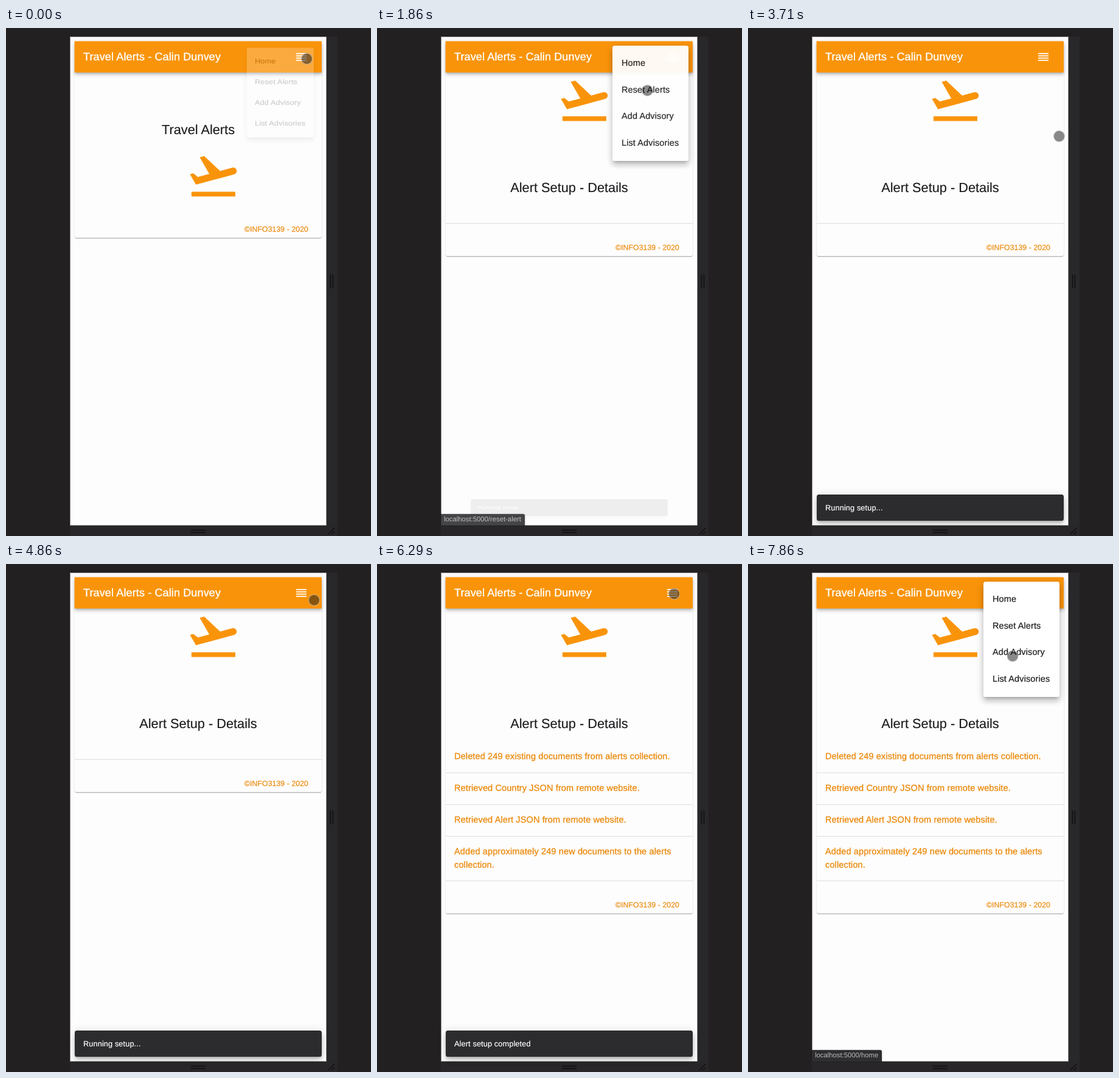
Write an HTML page that moves like this. It is 600 by 833 pixels and loops after 8 s.

```html
<!DOCTYPE html>
<html lang="en">
<head>
<meta charset="utf-8">
<title>Travel Alerts</title>
<style>
html, body { margin: 0; width: 100%; height: 100%; overflow: hidden; background: #232022; }
body { font-family: "Liberation Sans", Arial, sans-serif; text-rendering: geometricPrecision; position: relative; }
div, svg { position: absolute; box-sizing: border-box; }
.t { line-height: 20px; white-space: pre; }
#phone { left: 106px; top: 15px; width: 420px; height: 800px; background: #fefdfe;
  box-shadow: 0 0 0 1px rgba(254,253,254,.5); }
#rail { left: 526px; top: 14px; width: 19px; height: 802px; background: #282628; }
#foot { left: 105px; top: 815px; width: 440px; height: 18px; background: #282628; }
#grips { left: 0; top: 0; }
#card { left: 113px; top: 66px; width: 406px; background: #fefdfe; border-radius: 3.6px;
  box-shadow: 0 1.8px 1px -1px rgba(0,0,0,.2), 0 1px 1px rgba(0,0,0,.14), 0 1px 2.7px rgba(0,0,0,.12); }
#bar { left: 113px; top: 22px; width: 406px; height: 51px; background: #f9940a; color: #fff;
  box-shadow: -1px -1px 0 rgba(249,148,10,.4), 0 1.8px 3.6px -1px rgba(0,0,0,.2), 0 3.6px 4.5px rgba(0,0,0,.14), 0 1px 9px rgba(0,0,0,.12); }
#bar .t { left: 14px; top: 15px; font-size: 18px; letter-spacing: .13px; -webkit-text-stroke: .35px; }
#bar svg { left: 0; top: 0; transform: translate(361.2px, 14.2px); }
#plane { left: 0; top: 0; }
#title { left: 113px; width: 406px; text-align: center; font-size: 21.75px; color: #1c1b1d; -webkit-text-stroke: .15px; }
#copy { left: 392px; font-size: 12.2px; letter-spacing: .115px; color: #ec8d10; -webkit-text-stroke: .25px; }
.row { left: 127px; font-size: 14.5px; letter-spacing: .136px; line-height: 22px; white-space: pre; color: #ea8c10; -webkit-text-stroke: .35px; }
.rule { left: 113px; width: 406px; height: 1px; background: #dddce0; }
#snack { left: 113px; top: 765px; width: 406px; height: 43px; border-radius: 3.6px; background: #2c2b2d; color: #fff;
  box-shadow: 0 2.7px 4.5px -1px rgba(0,0,0,.2), 0 5.4px 9px rgba(0,0,0,.14), 0 1px 16px rgba(0,0,0,.12); }
#snack .t { left: 14px; top: 12px; font-size: 12.7px; letter-spacing: .136px; -webkit-text-stroke: .2px; }
#menu { left: 387px; top: 29px; width: 125px; height: 189px; border-radius: 3.6px; background: #fff; color: #1c1b1d;
  transform-origin: 74px 16px;
  box-shadow: 0 4.5px 4.5px -2.7px rgba(0,0,0,.2), 0 7px 9px 1px rgba(0,0,0,.14), 0 2.7px 12.7px 1.8px rgba(0,0,0,.12); }
#menu .t { left: 15px; font-size: 14.45px; letter-spacing: .135px; -webkit-text-stroke: .2px; }
#status { left: 105px; top: 797px; height: 19px; padding: 0 6px 0 5px; background: #2e2d2f; color: #b9b8ba;
  border-radius: 0 3px 0 0; box-shadow: 0 0 2px rgba(0,0,0,.5); font-size: 11.3px; line-height: 19px; white-space: pre; }
#touch { left: -9.5px; top: -9.5px; width: 19px; height: 19px; border-radius: 50%;
  background: rgba(20,20,20,.5); border: 1px solid rgba(255,255,255,.5); }
</style>
</head>
<body>
<div id="rail"></div>
<div id="foot"></div>
<div id="phone"></div>
<svg id="grips" width="600" height="833" fill="none" stroke="#0f0e10" stroke-width="1.4">
  <path d="M533.5 404v23M537.5 404v23M304 823.5h24M304 827.5h24M530 830l10-10M535.5 830l4.5-4.5"/>
</svg>

<div id="card"></div>
<svg id="plane" width="91" height="91" viewBox="0 0 24 24" fill="#f9940a">
  <path d="M2.5 19h19v2h-19zM22.07 9.64c-.21-.8-1.04-1.28-1.84-1.06L14.92 10l-6.9-6.43-1.93.51 4.14 7.17-4.97 1.33-1.97-1.54-1.45.39 1.82 3.16.77 1.33 1.6-.43 5.31-1.42 4.35-1.16L21 11.49c.81-.23 1.28-1.05 1.07-1.85z"/>
</svg>
<div id="title" class="t"></div>
<div id="list"></div>
<div id="copy" class="t">©INFO3139 - 2020</div>
<div id="bar">
  <div class="t">Travel Alerts - Calin Dunvey</div>
  <svg width="22.6" height="22.6" viewBox="0 0 24 24" fill="#fff"><path d="M3 5h18v2H3zM3 9h18v2H3zM3 13h18v2H3zM3 17h18v2H3z"/></svg>
</div>
<div id="snack"><div class="t"></div></div>
<div id="menu"></div>
<div id="status"></div>
<div id="touch"></div>

<script>
const $ = id => document.getElementById(id);
const LOOP = 8000, STEP = 1000 / 7;
const OPEN = -60, PICK = 1823, DONE = 5570, REOPEN = 6550;

const clamp = v => Math.max(0, Math.min(1, v));
const setText = (el, s) => { if (el.textContent !== s) el.textContent = s; };

// cubic-bezier(.4, 0, .2, 1)
function ease(x) {
  x = clamp(x);
  if (x === 0 || x === 1) return x;
  let lo = 0, hi = 1, u = .5;
  for (let i = 0; i < 24; i++) {
    u = (lo + hi) / 2;
    const bx = 1.2 * u * (1 - u) ** 2 + .6 * u * u * (1 - u) + u ** 3;
    if (bx < x) lo = u; else hi = u;
  }
  return 3 * u * u * (1 - u) + u ** 3;
}

function grow(el, t, open, close, inMs, outMs) {
  const alpha = ease((t - open) / inMs) * (1 - ease((t - close) / outMs));
  const size = ease((t - open) / (inMs * .666)) * (1 - ease((t - close - outMs / 3) / (outMs * .666)));
  const k = .75 + .25 * size;
  el.style.opacity = alpha;
  el.style.transform = `scale(${k}, ${k * k})`;
}

// time, x, y
const path = [
  [0, 494, 50], [430, 494, 50], [1290, 444, 102], [1860, 444, 102],
  [2430, 530, 176], [2570, 530, 180], [2714, 519.5, 179.5], [2857, 511, 177],
  [3860, 511, 177], [4860, 506, 58.5], [5000, 492, 49], [5143, 488, 48.5],
  [7570, 488, 48.5], [7714, 470, 85], [7857, 434.5, 150.5]
];

function along(keys, t) {
  const i = keys.findIndex(k => k[0] > t);
  if (i < 0) return keys[keys.length - 1].slice(1);
  const a = keys[i - 1], b = keys[i], u = (t - a[0]) / (b[0] - a[0]);
  return a.slice(1).map((v, j) => v + (b[j + 1] - v) * u);
}

function add(parent, cls, top, text = "") {
  const el = document.createElement("div");
  el.className = cls;
  el.style.top = top + "px";
  el.textContent = text;
  parent.append(el);
  return el;
}

["Home", "Reset Alerts", "Add Advisory", "List Advisories"]
  .forEach((s, i) => add($("menu"), "t", 19 + 43.5 * i, s));

const list = $("list");
[
  [305, "Deleted 249 existing documents from alerts collection.", 342],
  [357, "Retrieved Country JSON from remote website.", 394],
  [409, "Retrieved Alert JSON from remote website.", 446],
  [461, "Added approximately 249 new documents to the alerts\ncollection.", 519]
].forEach(([y, s, line]) => { add(list, "row", y, s); add(list, "rule", line); });
const emptyRule = add(document.body, "rule", 320);
document.body.insertBefore(emptyRule, list);

function layout(t) {
  const home = t < PICK, done = t >= DONE;
  const bottom = home ? 344 : done ? 573 : 374;
  $("card").style.height = bottom - 66 + "px";
  $("copy").style.top = bottom - 24 + "px";
  $("plane").style.transform = `translate(295.4px, ${home ? 196.5 : 72.8}px)`;
  $("title").style.top = (home ? 157 : 252) + "px";
  setText($("title"), home ? "Travel Alerts" : "Alert Setup - Details");
  list.style.display = done ? "" : "none";
  emptyRule.style.display = home || done ? "none" : "";
  setText($("snack").firstChild, done ? "Alert setup completed" : "Running setup...");
}

function draw(t) {
  layout(t);
  const first = t < 4000;
  const open = first ? OPEN : REOPEN, close = first ? PICK : Infinity;
  grow($("menu"), t, open, close, 250, 250);
  grow($("snack"), t, PICK, REOPEN - 10, 225, 195);

  const [x, y] = along(path, t);
  $("touch").style.transform = `translate(${x}px, ${y}px)`;
  setText($("status"), "localhost:5000/" + (first && y > 80 ? "reset-alert" : "home"));
  $("status").style.opacity = clamp((t - open - 70) / 118) * (1 - clamp((t - close) / 300));

  const lit = clamp((t - 2480) / 150) * (1 - clamp((t - 2760) / 180));
  const c = 40 + 20 * lit;
  $("rail").style.background = `rgb(${c}, ${c - 1}, ${c + 1})`;
}

function tick() {
  const t = performance.now() % LOOP;
  let n = Math.floor(t / STEP) + 1;
  while (n > 0 && Math.round(n * STEP / 10) * 10 > t) n--;
  draw(n * STEP);
  requestAnimationFrame(tick);
}
tick();
</script>
</body>
</html>
```
